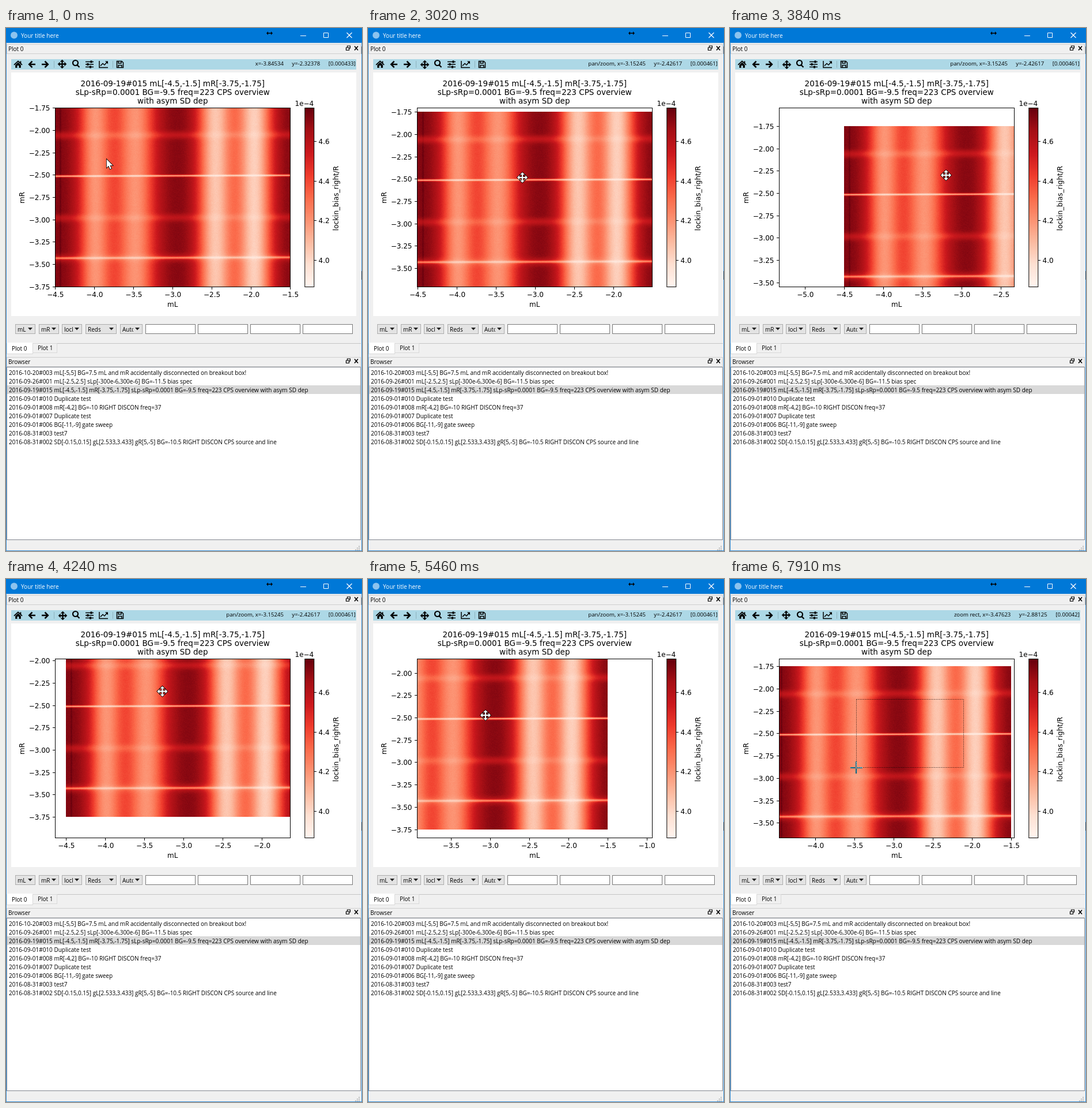
Write an HTML page with a canvas that moves like this. It is 618 by 906 pixels and loops after 8 s.

```html
<!DOCTYPE html>
<html lang="en">
<head>
<meta charset="utf-8">
<title>Plot window</title>
<style>
html, body { margin: 0; width: 100%; height: 100%; overflow: hidden; background: #f0f0f0; }
canvas { display: block; }
</style>
</head>
<body>
<canvas id="stage" width="618" height="906"></canvas>
<script>
const W = 618, H = 906, LOOP = 8000;
const UI = '"Open Sans", "Noto Sans", sans-serif';
const PLOT = '"DejaVu Sans", sans-serif';
const ctx = document.getElementById('stage').getContext('2d');
let g = ctx;

// Axes geometry: left, top, size and pixels per data unit
const AX = { x: 85.8, y: 138.6, w: 407.7, h: 309.6, sx: 135.9, sy: 154.8 };
const toX = x => AX.x + (x + 4.5) * AX.sx;
const toY = y => AX.y - (y + 1.75) * AX.sy;
const inAxes = (x, y) => x > AX.x && x < AX.x + AX.w && y > AX.y && y < AX.y + AX.h;

// ---- helpers ----
function box(x, y, w, h, fill, line) {
  if (fill) { g.fillStyle = fill; g.fillRect(x, y, w, h); }
  if (line) { g.strokeStyle = line; g.lineWidth = 1; g.strokeRect(x + .5, y + .5, w - 1, h - 1); }
}
function text(s, x, y, size, font = UI, align = 'left', color = '#000') {
  g.font = `${size}px ${font}`;
  g.textAlign = align;
  g.fillStyle = color;
  g.fillText(s, x, y);
}
function upText(s, x, y, size) {
  g.save();
  g.translate(x, y);
  g.rotate(-Math.PI / 2);
  text(s, 0, 0, size, PLOT, 'center');
  g.restore();
}
function shape(x, y, d, { fill, line, lw = 1, scale = 1 }) {
  const p = new Path2D(d);
  g.save();
  g.translate(x, y);
  g.scale(scale, scale);
  g.lineWidth = lw;
  if (line) { g.strokeStyle = line; g.stroke(p); }
  if (fill) { g.fillStyle = fill; g.fill(p); }
  g.restore();
}
function clipped(x, y, w, h, draw) {
  g.save();
  g.beginPath();
  g.rect(x, y, w, h);
  g.clip();
  draw();
  g.restore();
}
function offscreen(w, h, draw) {
  const c = document.createElement('canvas');
  c.width = w; c.height = h;
  const keep = g;
  g = c.getContext('2d');
  draw();
  g = keep;
  return c;
}

// ---- heat map ----
const REDS = 'fff5f0 fee0d2 fcbba1 fc9272 fb6a4a ef3b2c cb181d a50f15 67000d'.split(' ')
  .map(s => [16, 8, 0].map(k => parseInt(s, 16) >> k & 255));
function reds(v) {
  const p = Math.min(Math.max(v, 0), 1) * 8, i = Math.min(7, p | 0);
  return REDS[i].map((c, k) => c + (REDS[i + 1][k] - c) * (p - i));
}
const bell = (d, s) => Math.exp(-d * d / (2 * s * s));
const dip = (at, width, depth) => ({ at, width, depth });
const COLUMNS = [dip(9, 1, -.05), dip(69, 20.6, .57), dip(139.2, 25.2, .577), dip(278, 22, .73), dip(346, 22, .76)];
const RIDGES = [dip(47, 4.5, .15), dip(117.5, 1.2, .65), dip(190, 4.5, .14), dip(259.5, 1.5, .48), dip(259.5, 5, .13)];

// Pale columns lower the value; ridges scale it down and tilt slightly upwards
function field(u, v) {
  const tilt = (u / 408 - .5) * 1.5;
  const column = COLUMNS.reduce((s, c) => s - c.depth * bell(u - c.at, c.width), .95);
  return RIDGES.reduce((s, r) => s * (1 - r.depth * bell(v - r.at + tilt, r.width)), column);
}
const heat = offscreen(408, 310, () => {
  const img = g.createImageData(408, 310);
  let seed = 7;
  for (let y = 0, p = 0; y < 310; y++) {
    for (let x = 0; x < 408; x++) {
      seed = (Math.imul(seed, 1664525) + 1013904223) >>> 0;
      const c = reds(field(x, y) + (seed / 2 ** 32 - .5) * .03);
      for (const k of c) img.data[p++] = k;
      img.data[p++] = 255;
    }
  }
  g.putImageData(img, 0, 0);
});

// ---- still parts ----
function combo(s, x, w) {
  box(x, 513, w, 17, '#e3e3e3', '#adadad');
  clipped(x, 513, w - 16, 17, () => text(s, x + 4, 525.5, 10));
  shape(x + w - 9, 519, 'M-4 0h8l-4 4.5z', { fill: '#222' });
}
function dockTitle(s, y) {
  box(1, y - 8, 615, 17, '#f0f0f0', '#cfcfcf');
  text(s, 4, y + 4, 10);
  shape(594, y - 1, 'M-1.5-1.5v-2.5h5v4h-2M-3.5-1h5v4.5h-5z', { line: '#000', lw: 1.2 });
  shape(608, y - 1, 'M-3-3.5l6 7M3-3.5l-6 7', { line: '#000', lw: 1.6 });
}
const ROWS = [
  '2016-10-20#003 mL[-5,5] BG=7.5 mL and mR accidentally disconnected on breakout box!',
  '2016-09-26#001 mL[-2.5,2.5] sLp[-300e-6,300e-6] BG=-11.5 bias spec',
  '2016-09-19#015 mL[-4.5,-1.5] mR[-3.75,-1.75] sLp-sRp=0.0001 BG=-9.5 freq=223 CPS overview with asym SD dep',
  '2016-09-01#010 Duplicate test',
  '2016-09-01#008 mR[-4,2] BG=-10 RIGHT DISCON freq=37',
  '2016-09-01#007 Duplicate test',
  '2016-09-01#006 BG[-11,-9] gate sweep',
  '2016-08-31#003 test7',
  '2016-08-31#002 SD[-0.15,0.15] gL[2.533,3.433] gR[5,-5] BG=-10.5 RIGHT DISCON CPS source and line'
];

function titleBar() {
  box(0, 0, W, 26, '#0078d7');
  shape(14, 12.5, 'M6 0A6 6 0 1 1-6 0A6 6 0 1 1 6 0z', { fill: '#8cc3ee' });
  text('Your title here', 26, 16.5, 10, UI, 'left', '#fff');
  const white = { line: '#fff' };
  shape(516, 13.5, 'M-5 0h10', white);
  shape(555.5, 12.5, 'M-4-4h8v8h-8z', white);
  shape(596, 12.5, 'M-4.5-4.5l9 9M4.5-4.5l-9 9', { line: '#fff', lw: 1.2 });
  shape(457.5, 9, 'M-5.5 0l3-3v2.3h5v-2.3l3 3l-3 3v-2.3h-5v2.3z', { fill: '#000' });
}
function toolbar() {
  const ink = '#000', bold = { line: ink, lw: 2.6 }, thin = { line: ink, lw: 1.5 };
  box(9, 54, 599, 18, '#add8e6');
  shape(21, 63, 'M-7 .8L0-5.6L7 .8', { line: ink, lw: 1.8 });
  shape(21, 63, 'M-4.8 1L0-3.4L4.8 1V6H1.5V2h-3v4h-3.3zM3.3-5.5h2v4l-2-2z', { fill: ink });
  shape(45, 63, 'M6 0H-4M.5-5.3L-4.8 0L.5 5.3', bold);
  shape(68, 63, 'M-6 0H4M-.5-5.3L4.8 0L-.5 5.3', bold);
  shape(145, 63, 'M-7-4.5H7M-7 0H7M-7 4.5H7', thin);
  shape(145, 63, 'M1.5-6.5h3v4h-3zM-4.5-2h3v4h-3zM0 2.5h3v4H0z', { fill: ink });
  shape(169, 63, 'M-7-6V5.5H8M-5 2.5l4-4l3 2.5l4.5-5', thin);
  shape(169, 63, 'M3-5.5h5v5z', { fill: ink });
  shape(198, 63, 'M-5.5-5.5h8.5l2.5 2.5v8.5h-11zM-3 5.5V1.5h6v4M-3-5.5v3.5h5v-3.5', thin);
  for (const x of [83, 185]) box(x, 57, 1, 12, '#8fb2be');
}
function plotFrame() {
  box(9, 77, 599, 422, '#fff');
  ['2016-09-19#015 mL[-4.5,-1.5] mR[-3.75,-1.75]',
    'sLp-sRp=0.0001 BG=-9.5 freq=223 CPS overview',
    'with asym SD dep'].forEach((s, i) => text(s, 289.3, 100.5 + i * 15.4, 13.5, PLOT, 'center'));
  text('mL', 289.3, 483, 12, PLOT, 'center');
  upText('mR', 32, 294, 12);
  for (let y = 139; y < 448; y++) {
    box(519, y, 16, 1, `rgb(${reds(1 - (y - 139) / 309).map(Math.round)})`);
  }
  box(518.3, 138, 17, 311, null, '#000');
  for (let i = 0; i < 4; i++) {
    const y = 196 + i * 68.5;
    box(535, Math.round(y), 4, 1, '#000');
    text((4.6 - i * .2).toFixed(1), 542.5, y + 5, 12, PLOT);
  }
  text('1e\u22124', 501.5, 135, 12, PLOT);
  upText('lockin_bias_right/R', 577, 295, 12);
}
function lowerPanels() {
  combo('mL', 16, 35);
  combo('mR', 57, 35);
  combo('lockin', 97, 35);
  combo('Reds', 138, 54);
  combo('Auto', 198, 39);
  for (let i = 0; i < 4; i++) box(242 + i * 91, 513, 87, 17, '#fff', '#7a7a7a');

  box(0, 546, 616, 1, '#c4c4c4');
  box(46, 546, 43, 17, '#f0f0f0', '#d9d9d9');
  box(1, 546, 46, 19, '#fff', '#d9d9d9');
  box(2, 545, 44, 3, '#fff');
  text('Plot 0', 10, 558.5, 10);
  text('Plot 1', 55, 558, 10);

  dockTitle('Browser', 578);
  box(1, 587, 615, 300, '#fff', '#828790');
  box(2, 619, 613, 15, '#d9d9d9');
  ROWS.forEach((s, i) => text(s, 5, 600.5 + i * 15, 10));
  for (let r = 0; r < 3; r++) {
    for (let c = 0; c <= r; c++) box(612 - c * 3, 897 + r * 3, 2, 2, '#bfbfbf');
  }
}
const still = offscreen(W, H, () => {
  box(0, 0, W, H, '#f0f0f0');
  titleBar();
  dockTitle('Plot 0', 36);
  toolbar();
  plotFrame();
  lowerPanels();
  box(0, 25, W, H - 25, null, '#3a8fd6');
  box(617, 32, 1, 13, '#10395c');
  box(617, 421, 1, 15, '#10395c');
});

// ---- motion, in screen refreshes ----
const PAN_ON = 5, PRESS = 10, RELEASE = 25, ZOOM_ON = 29, DRAG = 32;
const SHIFT = [-5.2, 13.2];
const at = (x, y, [ox, oy] = [0, 0]) => [toX(x) + ox, toY(y) + oy];
const POINTER = [
  [0, ...at(-3.84534, -2.32378)],
  [PAN_ON, 97, 64],
  [6, 97, 64],
  [PRESS, ...at(-3.15245, -2.42617)],
  [11, 268, 259],
  [15, 375, 255],
  [19, 160, 146],
  [23, 204, 236],
  [RELEASE, ...at(-3.39204, -2.17019, SHIFT)],
  [30, 128, 65],
  [31, 300, 150],
  [DRAG, 405.5, 208.5],
  [35, ...at(-3.47623, -2.88125, SHIFT)]
];
// The picture follows the drag a little late
const PAN = [[PRESS, 0, 0], [11, .7, 7], [15, 112.9, 31.8], [19, -87.7, -96], [23, -77.3, -14.2], [RELEASE, ...SHIFT]];

// Smooth curve through keys of [step, x, y]
function curve(keys, step) {
  const last = keys.length - 1;
  let i = 0;
  while (i < last - 1 && step >= keys[i + 1][0]) i++;
  const slope = (j, k) => {
    const a = keys[Math.max(j - 1, 0)], b = keys[Math.min(j + 1, last)];
    return (b[k] - a[k]) / (b[0] - a[0]);
  };
  const a = keys[i], b = keys[i + 1], span = b[0] - a[0];
  const f = Math.min(Math.max((step - a[0]) / span, 0), 1), e = f * f * (3 - 2 * f);
  return [1, 2].map(k => a[k] + (b[k] - a[k]) * e +
    span * f * (1 - f) * (slope(i, k) * (1 - f) - slope(i + 1, k) * f));
}
// The screen refreshes about five times a second, with one longer pause on the button
function stepAt(t) {
  if (t < 810) return 0;
  if (t < 2204) return Math.min(6, 1 + Math.floor((t - 810) / 198));
  return Math.min(35, 7 + Math.floor((t - 2204) / 203.5));
}

function status(step) {
  const mode = step < PAN_ON ? '' : step < ZOOM_ON ? 'pan/zoom' : 'zoom rect';
  const seen = step >= PRESS && step < RELEASE ? PRESS : step;
  const [x, y] = curve(POINTER, seen), [ox, oy] = curve(PAN, seen);
  let right = 607;
  const put = s => {
    text(s, right, 64.5, 9.6, UI, 'right');
    right -= g.measureText(s).width + 14.5;
  };
  if (!inAxes(x, y)) return put(mode);
  const u = x - ox - AX.x, v = y - oy - AX.y;
  const value = Number(((3.864 + field(u, v) * .906) * 1e-4).toPrecision(3));
  put(`[${value}]`);
  put('y=' + (-1.75 - v / AX.sy).toFixed(5));
  put((mode && mode + ', ') + 'x=' + (u / AX.sx - 4.5).toFixed(5));
}
function axes(ox, oy) {
  clipped(86, 139, 407, 309, () =>
    g.drawImage(heat, Math.floor(AX.x + ox), Math.floor(AX.y + oy)));
  box(85, 138, 409, 311, null, '#000');
  const label = (v, n) => v.toFixed(n).replace('-', '\u2212');
  for (let v = -6; v <= 0; v += .5) {
    const x = toX(v) + ox;
    if (x < AX.x - .1 || x > AX.x + AX.w + .1) continue;
    box(Math.floor(x), 449, 1, 4, '#000');
    text(label(v, 1), x, 466, 12, PLOT, 'center');
  }
  for (let v = -5; v <= -1; v += .25) {
    const y = toY(v) + oy;
    if (y < AX.y - .1 || y > AX.y + AX.h + .1) continue;
    box(81, Math.floor(y), 4, 1, '#000');
    text(label(v, 2), 76.5, y + 4.5, 12, PLOT, 'right');
  }
}
const MOVE = 'M-7.5 0l3.3-3.3v2.4h3.3v-3.3h-2.4L0-7.5l3.3 3.3H.9v3.3h3.3v-2.4L7.5 0L4.2 3.3V.9H.9v3.3h2.4L0 7.5l-3.3-3.3h2.4V.9h-3.3v2.4z';

// A pressed tool button sits one pixel lower and further right
function modeIcons(step) {
  const zoom = step >= ZOOM_ON ? 1 : 0, pan = step >= PAN_ON ? 1 - zoom : 0;
  shape(97.5 + pan, 62.5 + pan, MOVE, { fill: '#000', line: '#000', lw: .5 });
  shape(121 + zoom, 62 + zoom, 'M4-1.5A4.5 4.5 0 1 1-5-1.5A4.5 4.5 0 1 1 4-1.5zM2.5 2L6.5 6', { line: '#000', lw: 2.2 });
}
function pointer(step, x, y) {
  if (step < PAN_ON || !inAxes(x, y)) {
    shape(x, y, 'M0 0V14.5L3.4 11.4L5.8 17L8.2 16L5.8 10.6H10.4z', { fill: '#fff', line: '#000', lw: 1.6 });
  } else if (step < ZOOM_ON) {
    shape(x, y, MOVE, { fill: '#fff', line: '#000', lw: 1.3, scale: 1.2 });
  } else {
    g.globalCompositeOperation = 'difference';
    box(Math.round(x) - 11, Math.round(y) - 1, 21, 2, '#fff');
    box(Math.round(x) - 2, Math.round(y) - 11, 2, 21, '#fff');
    g.globalCompositeOperation = 'source-over';
  }
}
function zoomRect(x, y) {
  const [x0, y0] = curve(POINTER, DRAG);
  const l = Math.floor(x) + .5, b = Math.floor(y) + .5;
  g.strokeStyle = '#000';
  g.lineWidth = 1;
  g.setLineDash([1, 2]);
  g.strokeRect(l, y0, x0 - l, b - y0);
  g.setLineDash([]);
}
function render(t) {
  const step = stepAt(t), [x, y] = curve(POINTER, step);
  g.drawImage(still, 0, 0);
  modeIcons(step);
  status(step);
  axes(...curve(PAN, step));
  if (step > DRAG) zoomRect(x, y);
  pointer(step, x, y);
}

const start = performance.now();
function tick() {
  render((performance.now() - start) % LOOP);
  requestAnimationFrame(tick);
}
tick();
</script>
</body>
</html>
```
